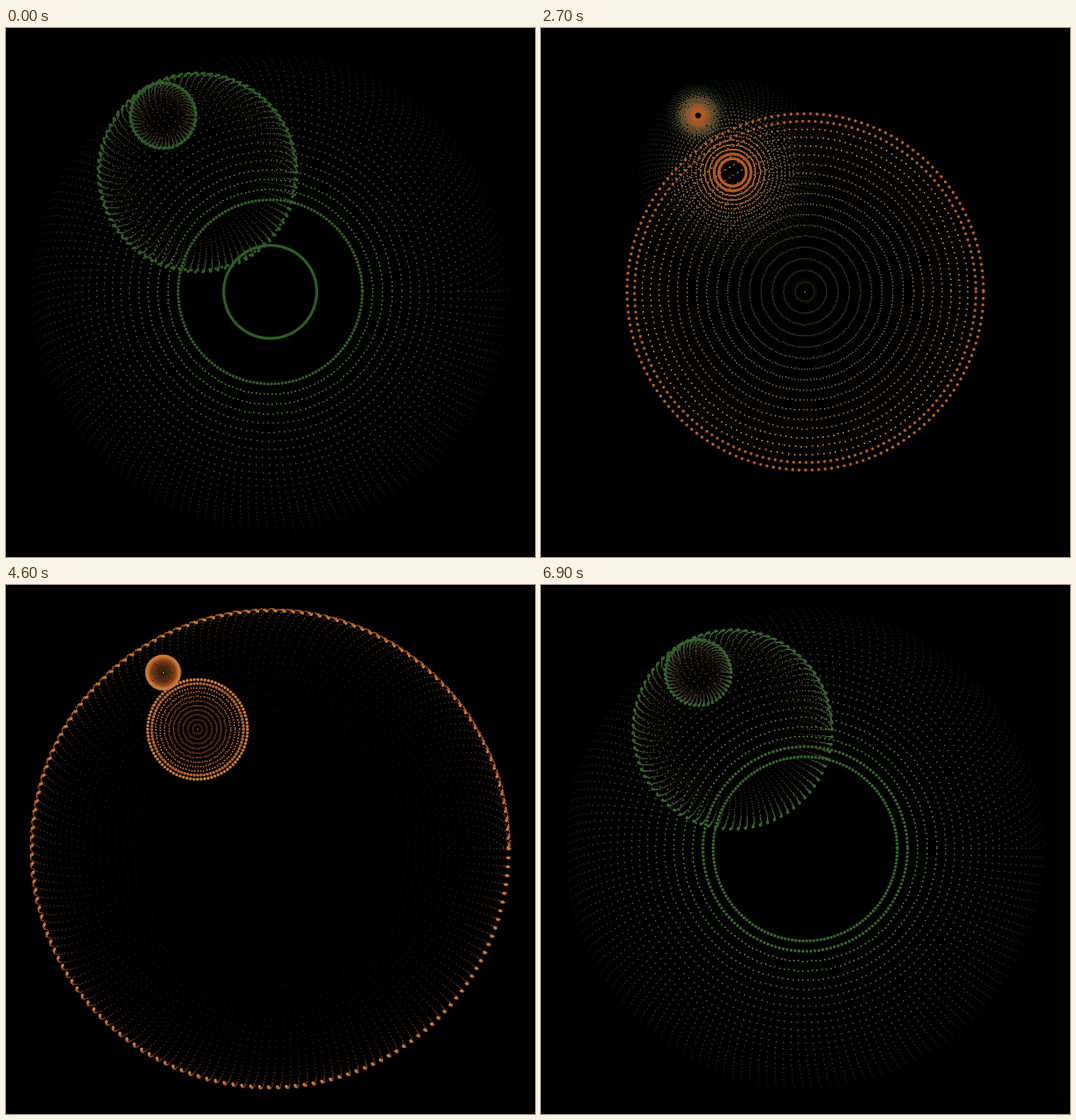
Write an HTML page with a canvas that moves like this. It is 600 by 600 pixels and loops after 7000 ms.

```html
<!DOCTYPE html>
<html>
<head>
<meta charset="utf-8">
<style>
html, body { margin: 0; width: 100%; height: 100%; overflow: hidden; background: #000; }
canvas { display: block; }
</style>
</head>
<body>
<canvas id="stage" width="600" height="600"></canvas>
<script>
const ctx = document.getElementById('stage').getContext('2d');
const FRAMES = 70, STEP = 100, PERIOD = 73.2, TRAIL = 24, FADE = 0.91;
const DRIFT = 0.3, TAU = Math.PI * 2;

// peak is the step at which a ring is widest
const rings = [
  { x: 299.7, y: 299.3, size: 272, dots: 180, peak: 43.2 },
  { x: 217.3, y: 163.8, size: 113, dots: 100, peak: 69 },
  { x: 178.2, y: 99.3, size: 37.5, dots: 60, peak: 69 }
];

// Brown to green and back once per loop
const palette = [[130, 72, 38], [185, 92, 36], [235, 200, 125], [110, 155, 95], [45, 92, 35]];

function colorAt(step, level) {
  const pos = Math.abs(step / FRAMES * 2 - 1) * (palette.length - 1);
  const k = Math.min(Math.floor(pos), palette.length - 2);
  const rgb = palette[k].map((c, i) => Math.round((c + (palette[k + 1][i] - c) * (pos - k)) * level));
  return `rgb(${rgb})`;
}

// A cosine swell that rests at zero for a few steps
function radiusAt(ring, step) {
  const half = PERIOD / 2;
  const d = (step - ring.peak + half + PERIOD) % PERIOD - half;
  return ring.size * Math.max(0, (335 * Math.cos(0.0406 * d) - 63) / 272);
}

function drawRing(ring, step, age) {
  const r = radiusAt(ring, step);
  if (r < 1) {
    // dots stacked on the centre stay bright
    ctx.fillStyle = '#ddd';
    ctx.fillRect(Math.floor(ring.x), Math.floor(ring.y), 1, 1);
    return;
  }
  const gap = TAU / ring.dots * (1 + step * DRIFT / ring.dots);
  const size = 2 - age * 0.03;
  ctx.fillStyle = colorAt(step, FADE ** age);
  ctx.beginPath();
  for (let a = 0; a < TAU; a += gap) {
    const x = ring.x + r * Math.cos(a), y = ring.y + r * Math.sin(a);
    if (age < 2) {
      ctx.moveTo(x + 1.8, y);
      ctx.arc(x, y, 1.8, 0, TAU);
    } else {
      ctx.rect(Math.round(x - 1), Math.round(y - 1), size, size);
    }
  }
  ctx.fill();
}

function draw(frame) {
  ctx.fillStyle = '#000';
  ctx.fillRect(0, 0, 600, 600);
  for (let age = TRAIL; age >= 0; age--) {
    const step = (frame - age + FRAMES) % FRAMES;
    for (const ring of rings) drawRing(ring, step, age);
  }
}

let shown = -1;
const start = performance.now();
function tick() {
  const frame = Math.floor((performance.now() - start) / STEP) % FRAMES;
  if (frame !== shown) draw(shown = frame);
  requestAnimationFrame(tick);
}
tick();
</script>
</body>
</html>
```
